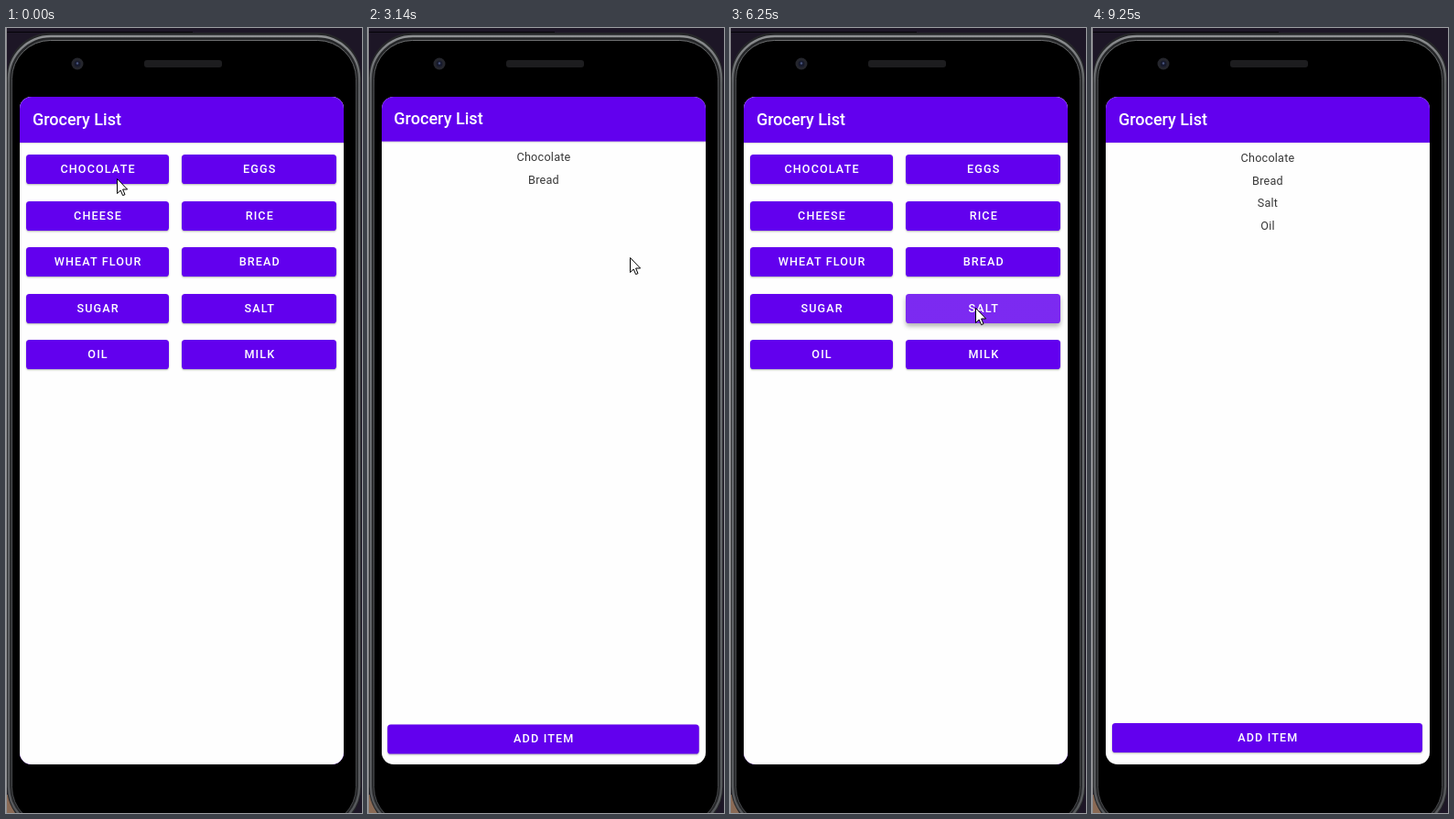
Recreate the animation shown at these times as an HTML page. Size 389 by 856 pixels, loop 9400 ms.

```html
<!DOCTYPE html>
<html lang="en">
<head>
<meta charset="utf-8">
<title>Grocery List</title>
<style>
  html, body { margin: 0; width: 100%; height: 100%; overflow: hidden; background: #1d1626; }
  body { position: relative; font-family: Roboto, sans-serif; }
  svg { position: absolute; left: 0; top: 0; overflow: visible; }
  #screen { position: absolute; left: 15px; top: 75px; width: 354px; height: 728px; border-radius: 13px; overflow: hidden; }
  .page { position: absolute; inset: 0; background: #fefefe; }
  header { height: 50px; background: #6200ee; box-shadow: 0 1px 1px #0002; color: #fff;
    font: 500 18px/50px Roboto, sans-serif; padding-left: 14px; }
  .button { position: absolute; height: 32px; border-radius: 3.6px; background: #6200ee; color: #fff;
    font: 500 12.6px/32px Roboto, sans-serif; letter-spacing: 1.124px; text-indent: 1.6px;
    text-align: center; text-transform: uppercase; white-space: nowrap; }
  .item { position: absolute; width: 354px; text-align: center; color: #383838;
    font: 12.6px/16px Roboto, sans-serif; letter-spacing: .225px; }
</style>
</head>
<body>
<svg width="389" height="856">
  <defs>
    <linearGradient id="metal" x2="0" y2="1">
      <stop stop-color="#8e9092"/><stop offset=".06" stop-color="#5c5e61"/>
      <stop offset=".4" stop-color="#6d7074"/><stop offset="1" stop-color="#55575a"/>
    </linearGradient>
  </defs>
  <path d="M0 836H12V856H0Z" fill="#8a6a55"/>
  <path d="M0 4.5H204" stroke="#050308"/>
  <path d="M.5 0V856" stroke="#8b8b8e"/>
  <rect x="1" y="5" width="387" height="871" rx="48" fill="#252628"/>
  <g fill="none" stroke="url(#metal)">
    <rect x="3" y="9" width="383" height="864" rx="46" stroke-width="2.4"/>
    <rect x="6.5" y="13.5" width="376" height="856" rx="42" fill="#000" stroke-opacity=".75"/>
  </g>
  <rect x="151" y="35" width="85" height="8" rx="3" fill="#1d1d1f"/>
  <circle cx="78" cy="39" r="6.5" fill="#25262d"/>
  <circle cx="78" cy="39" r="3.5" fill="#171a2c"/>
  <circle cx="78" cy="38.5" r="1.2" fill="#4a5680"/>
</svg>
<div id="screen">
  <div class="page" id="list"><header>Grocery List</header></div>
  <div class="page" id="picker"><header>Grocery List</header></div>
</div>
<svg id="cursor" width="13" height="20">
  <path d="M.5 .5V16.5L4.2 13L6.6 18.6L9 17.6L6.6 12H11.6Z" fill="#fff" stroke="#000"/>
</svg>
<script>
const LOOP = 9400, LAUNCH_DELAY = 290, TRANSITION = 400;
const products = ['Chocolate', 'Eggs', 'Cheese', 'Rice', 'Wheat flour', 'Bread', 'Sugar', 'Salt', 'Oil', 'Milk'];

// A tap without a product is on "Add item" and opens the picker.
const taps = [[120, 'Chocolate'], [1790], [2690, 'Bread'], [4269], [5980, 'Salt'], [7770], [8610, 'Oil']]
  .map(([time, product]) => ({ time, product }));

// Cursor keys: time, x, y
const path = [
  [0, 121, 164], [640, 121, 164], [1277, 103, 772], [1700, 150, 770], [1960, 150, 770],
  [2320, 290, 273], [2470, 286, 250], [3560, 286, 250], [4200, 205, 769], [4600, 205, 769],
  [5130, 240, 300], [5400, 243, 303], [5550, 243, 303], [5850, 268, 305], [6560, 268, 305],
  [7600, 175, 775], [8000, 175, 775], [8500, 104, 352], [8920, 104, 352], [9240, 80, 880], [LOOP, 80, 880]
];

const { list, picker, cursor } = Object.fromEntries(
  ['list', 'picker', 'cursor'].map(id => [id, document.getElementById(id)]));
const clamp = v => Math.min(1, Math.max(0, v));
const mix = (a, b, k) => a + (b - a) * k;
const smooth = k => k * k * (3 - 2 * k);

function bezier(x, x0, y0, x1, y1, x2, y2, x3, y3) {
  const at = (u, a, b, c, d) => {
    const v = 1 - u;
    return v * v * v * a + 3 * v * v * u * b + 3 * v * u * u * c + u * u * u * d;
  };
  let low = 0, high = 1;
  for (let i = 0; i < 24; i++) {
    const mid = (low + high) / 2;
    if (at(mid, x0, x1, x2, x3) < x) low = mid; else high = mid;
  }
  return at(low, y0, y1, y2, y3);
}
const fastOutSlowIn = k => bezier(k, 0, 0, .4, 0, .2, 1, 1, 1);
const extraSlowIn = k => k < 1 / 6
  ? bezier(k, 0, 0, .05, 0, .1333, .06, 1 / 6, .4)
  : bezier(k, 1 / 6, .4, .2083, .82, .25, 1, 1, 1);

function add(page, className, text, style) {
  const el = document.createElement('div');
  el.className = className;
  el.textContent = text;
  Object.assign(el.style, style);
  page.append(el);
  return el;
}
function addButton(page, text, x, y, width) {
  const el = add(page, 'button', text, { left: x + 'px', top: y + 'px', width: width + 'px' });
  return { el, x, y, width, height: 32 };
}

const addItem = addButton(list, 'Add item', 7, 683, 339);
const buttons = products.map((name, i) =>
  addButton(picker, name, i % 2 ? 177 : 7, 63 + 50.5 * (i >> 1), i % 2 ? 169 : 155.5));
const items = taps.filter(tap => tap.product).map((tap, i) =>
  ({ tap, el: add(list, 'item', tap.product, { top: 59 + 24.6 * i + 'px' }) }));
for (const tap of taps) tap.button = tap.product ? buttons[products.indexOf(tap.product)] : addItem;

function cursorAt(t) {
  const i = Math.max(1, path.findIndex(key => key[0] > t));
  const [t0, x0, y0] = path[i - 1], [t1, x1, y1] = path[i];
  const k = smooth((t - t0) / (t1 - t0));
  return [mix(x0, x1, k), mix(y0, y1, k)];
}

function drawButton(button, t) {
  const { el, x, y, width, height } = button;
  const tap = taps.find(p => p.button === button && t >= p.time && t < p.time + 400);
  const age = tap ? t - tap.time : 0;
  const lift = tap ? clamp(age / 100) * clamp((350 - age) / 100) : 0;
  el.style.boxShadow = `0 ${1 + 3 * lift}px ${2 + 4 * lift}px rgba(0,0,0,.3)`;
  el.style.backgroundImage = 'none';
  if (!tap) return;
  const [cx, cy] = cursorAt(tap.time);
  const k = fastOutSlowIn(clamp(age / 225));
  const radius = mix(width * .3, Math.hypot(width, height) / 2, k);
  const alpha = .24 * clamp(age / 75) * clamp((375 - age) / 150);
  const px = mix(cx - 15 - x, width / 2, k), py = mix(cy - 75 - y, height / 2, k);
  el.style.backgroundImage = `radial-gradient(circle at ${px}px ${py}px,
    rgba(255,255,255,${alpha}) ${radius}px, rgba(255,255,255,0) ${radius + 1}px)`;
}

function drawPages(t) {
  const tap = taps.filter(p => p.time + LAUNCH_DELAY <= t).pop();
  const age = tap ? t - tap.time - LAUNCH_DELAY : TRANSITION;
  const k = extraSlowIn(clamp(age / TRANSITION));
  const closing = tap && tap.product;
  list.style.transform = `scale(${closing ? mix(1.05, 1, k) : mix(1, 1.05, k)})`;
  picker.style.transform = `scale(${closing ? mix(1, .9, k) : mix(.85, 1, k)})`;
  picker.style.opacity = closing ? 1 - clamp((age - 35) / 83) : clamp((age - 50) / 83);
  for (const item of items) item.el.hidden = t < item.tap.time + LAUNCH_DELAY;
}

function draw(now) {
  const t = now % LOOP;
  drawPages(t);
  [addItem, ...buttons].forEach(button => drawButton(button, t));
  const [x, y] = cursorAt(t);
  cursor.style.transform = `translate(${x}px, ${y}px)`;
  requestAnimationFrame(draw);
}
draw(0);
</script>
</body>
</html>
```
